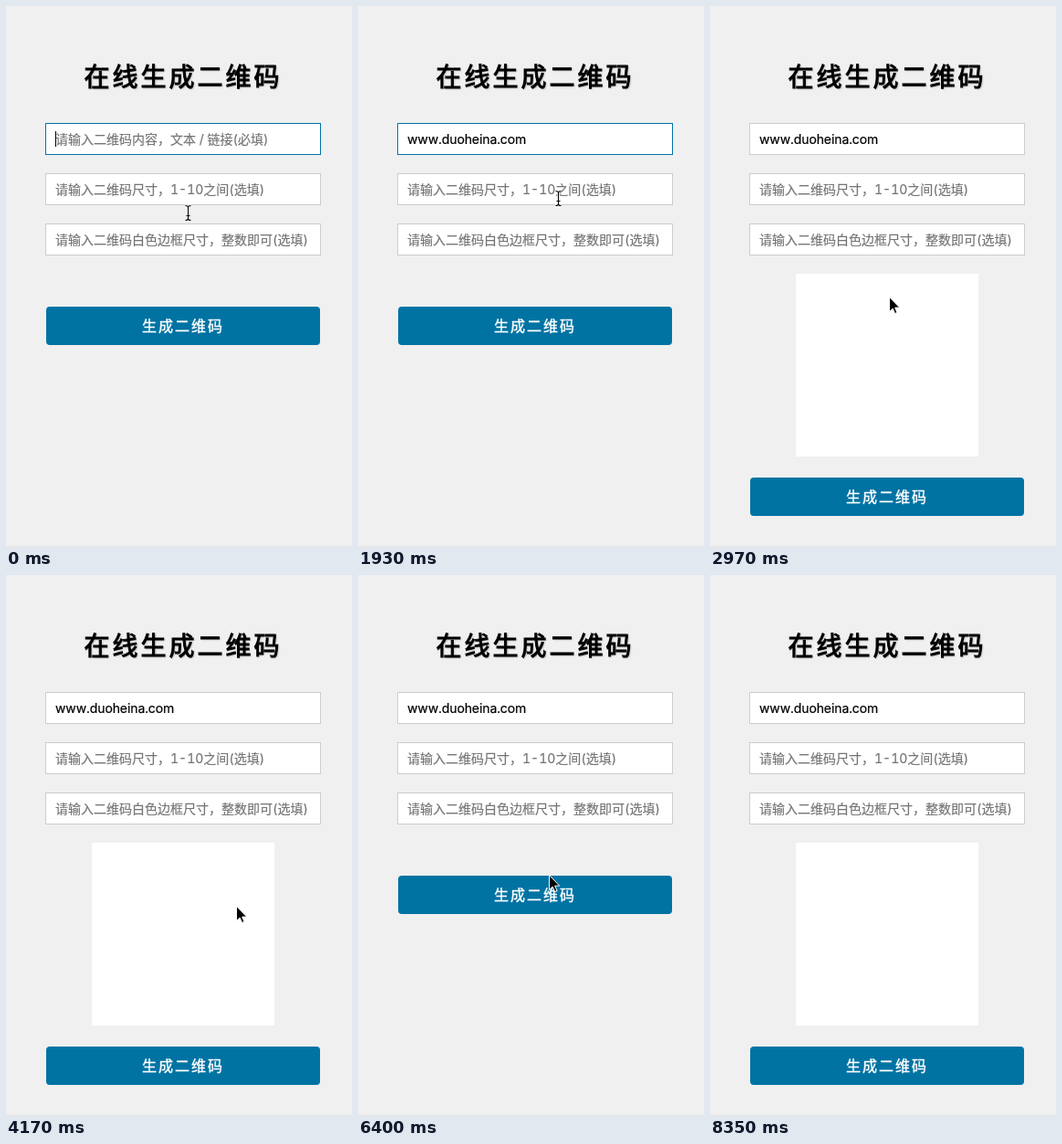
An HTML page for the animation above (8.79 s loop, 379 px wide and 592 px high).

```html
<!DOCTYPE html>
<html lang="zh-CN">
<head>
<meta charset="utf-8">
<title>在线生成二维码</title>
<style>
html, body { margin: 0; width: 100%; height: 100%; overflow: hidden; background: #f0f0f0; }
body { position: relative; font: 14px/33px Inter, "Noto Sans CJK SC", "Noto Sans CJK", sans-serif;
  font-variant-numeric: tabular-nums; }
h1, .field, button, #panel, svg, #edge { position: absolute; box-sizing: border-box; margin: 0; }
h1 { left: 44px; top: 58px; width: 300px; text-align: center; white-space: nowrap;
  font-size: 28px; font-weight: 400; line-height: 40px; letter-spacing: 3px; color: #000;
  -webkit-text-stroke: 1px #000; text-shadow: 1px 1px 2px rgba(0,0,0,.3); }
.field { left: 43px; width: 302px; height: 35px; padding-left: 10px; background: #fff;
  border: 1px solid #ccc; color: #757575; white-space: nowrap; -webkit-text-stroke: .2px; }
.field.focus { border-color: #0073a3; }
#url { color: #000; letter-spacing: -.1px; }
#caret { position: absolute; top: 8px; width: 1px; height: 17px; background: #000; }
#panel { left: 94px; top: 293px; width: 200px; height: 200px; background: #fff; }
button { left: 44px; width: 300px; height: 42px; padding: 0; border: 0; border-radius: 4px; background: #0073a3;
  color: #fff; font: 16px/42px Inter, "Noto Sans CJK SC", "Noto Sans CJK", sans-serif; letter-spacing: 2px;
  -webkit-text-stroke: .4px; }
#edge { left: 0; top: 591px; width: 379px; height: 1px; background: #e4e4e4; }
svg { left: 0; top: 0; width: 379px; height: 592px; }
</style>
</head>
<body>
<h1>在线生成二维码</h1>
<div class="field" id="first" style="top:128px"><span id="url">www.duoheina.com</span><i id="caret"></i><span id="hint">请输入二维码内容，文本 / 链接(必填)</span></div>
<div class="field" style="top:183px">请输入二维码尺寸，1-10之间(选填)</div>
<div class="field" style="top:238px">请输入二维码白色边框尺寸，整数即可(选填)</div>
<div id="panel"></div>
<button id="make">生成二维码</button>
<div id="edge"></div>
<svg viewBox="0 0 379 592">
  <defs><path id="bar" d="M-3-8Q0-8 0-6V6Q0 8-3 8M3-8Q0-8 0-6M0 6Q0 8 3 8M-2 3H2" fill="none"/></defs>
  <path id="arrow" d="M0 0V16L3.7 12.6 6 18 8.5 17 6.2 11.6H11.2Z" stroke="#fff" stroke-linejoin="round"/>
  <g id="beam"><use href="#bar" stroke="#fff" stroke-width="2.6"/><use href="#bar" stroke="#000" stroke-width="1.1"/></g>
</svg>
<script>
const LOOP = 8790, TICK = 149;
const $ = id => document.getElementById(id);
const show = (id, on) => $(id).style.display = on ? '' : 'none';

// stops of the pointer: time, x, y
const stops = [
  [0, 199, 226], [1190, 240, 348], [1930, 219, 210], [2680, 203, 336],
  [2970, 196, 318], [3420, 200, 250], [4170, 252, 362], [4650, 149, 446],
  [5210, 209, 328], [7000, 209, 328], [7300, 219, 322], [7600, 219, 322],
  [8350, 330, 606]
];

function pointerAt(t) {
  const next = stops.findIndex(s => s[0] > t);
  if (next < 0) return stops.at(-1).slice(1);
  const [t0, x0, y0] = stops[next - 1], [t1, x1, y1] = stops[next];
  const ease = (1 - Math.cos(Math.PI * (t - t0) / (t1 - t0))) / 2;
  return [x0 + (x1 - x0) * ease, y0 + (y1 - y0) * ease];
}

function draw(now) {
  const t = now % LOOP;
  const typed = t >= 150, focused = t < 2820;
  const made = t >= 2970 && !(t >= 6400 && t < 6550);
  show('url', typed);
  show('hint', !typed);
  show('caret', focused && (!typed || (t - 150) % 1000 < 500));
  show('panel', made);
  $('first').classList.toggle('focus', focused);
  $('make').style.top = (made ? 516 : 329) + 'px';

  // the pointer is sampled in steps
  const [x, y] = pointerAt(Math.floor((t + 10) / TICK) * TICK);
  const overText = y < 274;
  show('beam', overText);
  show('arrow', !overText);
  $(overText ? 'beam' : 'arrow').setAttribute('transform', `translate(${Math.round(x) + .5} ${Math.round(y) + .5})`);
  requestAnimationFrame(() => draw(performance.now() - start));
}
const start = performance.now();
draw(0);
</script>
</body>
</html>
```
